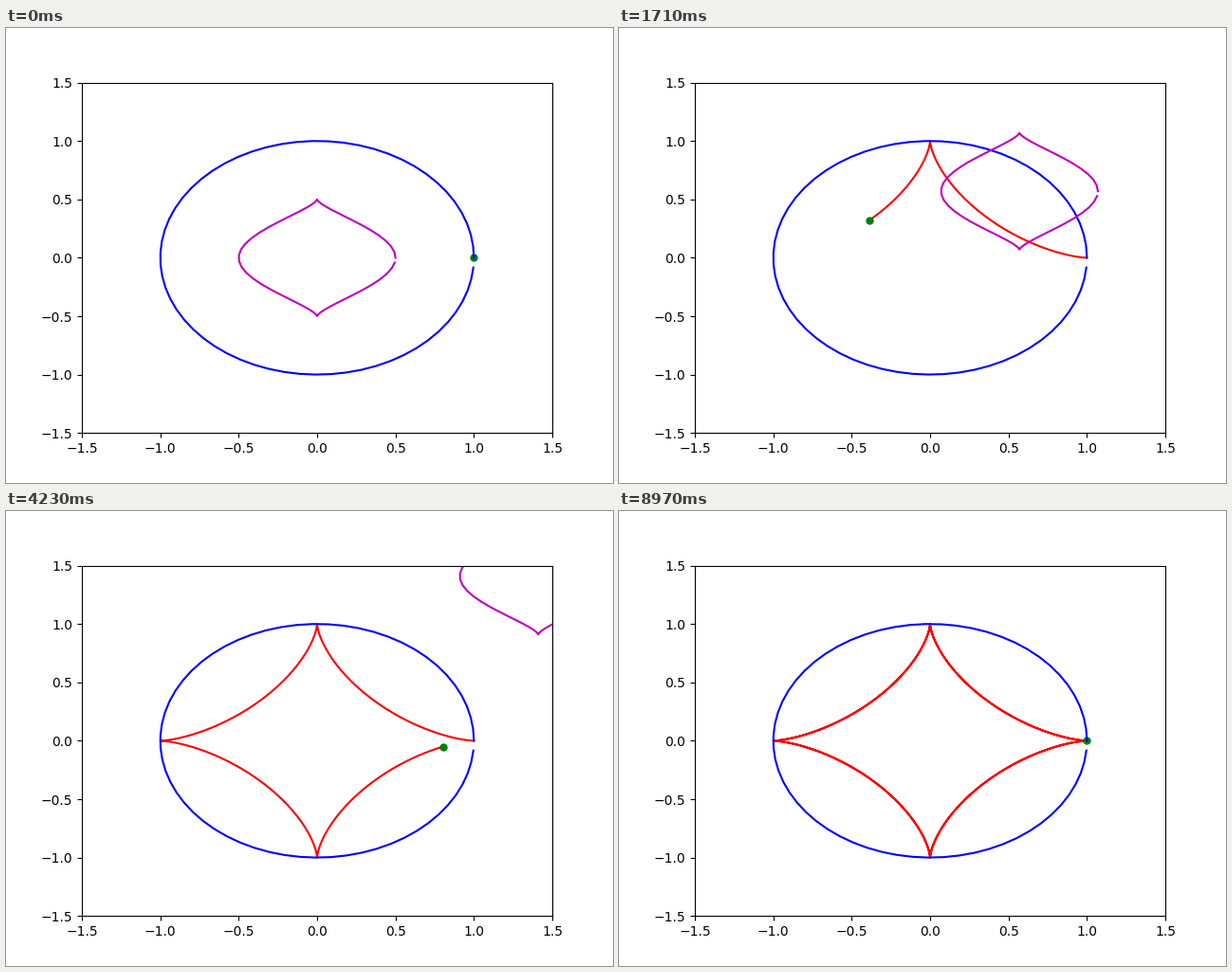
These frames come from a looping animation (640x480 px, 9000 ms). A matplotlib script:

```python
import numpy as np
import matplotlib.pyplot as plt
from matplotlib.animation import FuncAnimation

FRAMES = 300
INTERVAL = 30
DRIFT = 0.01

fig, ax = plt.subplots(figsize=(6.4, 4.8), dpi=100)
ax.set_xlim(-1.5, 1.5)
ax.set_ylim(-1.5, 1.5)

# Two full turns along the astroid
angle = np.arange(FRAMES) * 4 * np.pi / FRAMES
path_x, path_y = np.cos(angle) ** 3, np.sin(angle) ** 3

# Coarse sampling leaves the small gap at the end of each closed curve
t = np.arange(0, 2 * np.pi, 0.1)
shape_x, shape_y = 0.5 * np.cos(t) ** 3, 0.5 * np.sin(t)

trail, = ax.plot([], [], "r-")
dot, = ax.plot([], [], "go", markersize=5)
circle, = ax.plot(np.cos(t), np.sin(t), "b-")
shape, = ax.plot([], [], "m-")


def update(i):
    trail.set_data(path_x[:i + 1], path_y[:i + 1])
    dot.set_data(path_x[i:i + 1], path_y[i:i + 1])
    shape.set_data(shape_x + DRIFT * i, shape_y + DRIFT * i)
    return trail, dot, circle, shape


anim = FuncAnimation(fig, update, frames=FRAMES, interval=INTERVAL,
                     repeat=True, repeat_delay=0)
plt.show()
```
